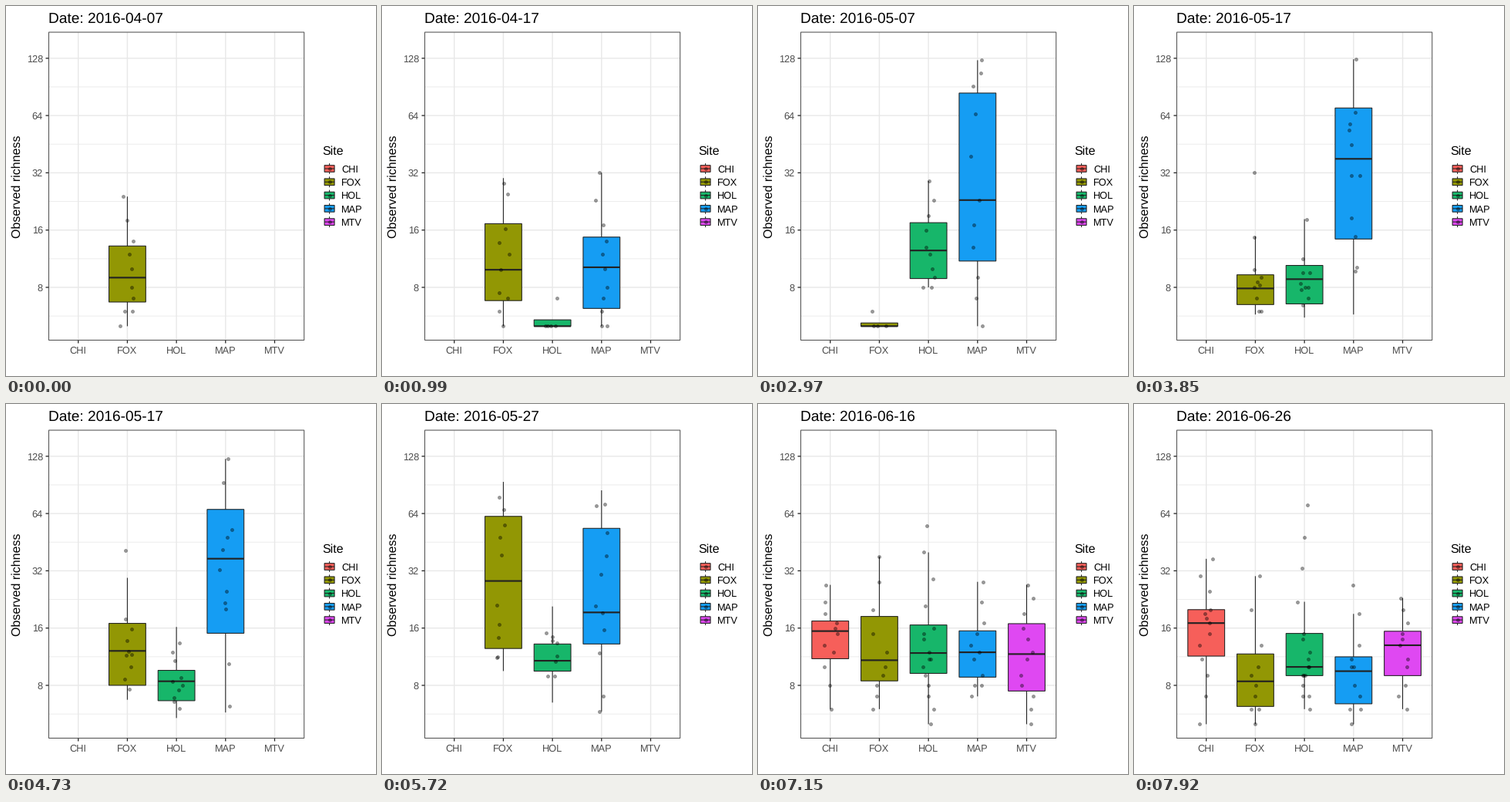
A matplotlib script for the animation above (8 s loop, 480x480 px).

```python
import numpy as np
import matplotlib.pyplot as plt
from matplotlib.animation import FuncAnimation
from matplotlib.patches import Rectangle

plt.rcParams["font.family"] = "Liberation Sans"
plt.rcParams["text.hinting"] = "none"

SIZE, DPI = 480, 80
PX = 72 / DPI                      # points per pixel
LOOP, INTERVAL, STEP = 8000, 40, 110
HOLD, CYCLE = 7, 9                 # steps at rest, steps per date

SITES = ["CHI", "FOX", "HOL", "MAP", "MTV"]
FILLS = ["#f65f5a", "#929704", "#17b66a", "#159df3", "#df48f2"]
COUNTS = dict(zip(SITES, [13, 10, 18, 11, 16]))
INK, AXIS_TEXT, GRID = "#222222", "#4d4d4d", "#e8e8e8"

UNIT = 63.7                        # distance between sites
LEFT, TOP, BOTTOM = 55.5, 34.0, 433.5
RIGHT = LEFT + 5.2 * UNIT
CENTER = {site: LEFT + UNIT * (0.6 + i) for i, site in enumerate(SITES)}
BOX_W = 0.75 * UNIT
LINE = 1.07

FIRST_DAY, DAYS = np.datetime64("2016-04-07"), 10

# Minimum, quartiles and maximum of richness, per surveyed date.
# None is a date halfway between its neighbours.
SURVEYS = [
    dict(FOX=(5, 6.7, 9, 13.2, 24)),
    None,
    dict(FOX=(5, 7, 11.5, 26.4, 44), HOL=(5, 5, 5, 5.4, 7),
         MAP=(5, 6.2, 10.2, 14.7, 32)),
    dict(FOX=(5, 5, 5, 5.2, 6), HOL=(8, 8.9, 12.5, 17.5, 29),
         MAP=(5, 11, 23, 84, 125)),
    dict(FOX=(6, 7, 9, 11, 32), HOL=(5, 6, 8, 9, 16),
         MAP=(6, 15.5, 43.7, 66.6, 127)),
    dict(FOX=(10, 12.8, 34.6, 76.8, 113), HOL=(7, 9.5, 10, 12, 17),
         MAP=(5, 13.5, 20.8, 69.7, 114)),
    dict(CHI=(8, 10.7, 14, 15.2, 19), FOX=(8, 11.5, 14, 29, 49),
         HOL=(5, 9.5, 14, 18.4, 42), MAP=(10, 12.2, 15, 21.2, 30),
         MTV=(5, 6.2, 10.5, 18.5, 32)),
    None,
    dict(CHI=(5, 11.4, 17, 20, 37), FOX=(5, 6.2, 8.4, 11.7, 30),
         HOL=(6, 9, 10, 15, 71), MAP=(5, 6.4, 9.5, 11.3, 27),
         MTV=(6, 9, 13, 15.4, 23)),
]

rng = np.random.default_rng(7)


def y_of(log2_value):
    return 365.0 - 74.3 * (log2_value - 3)


def halfway(before, after):
    """Geometric mean of two surveys; a site in only one is kept as it is."""
    return {site: np.sqrt(np.multiply(before.get(site, after.get(site)),
                                      after.get(site, before.get(site))))
            for site in {**before, **after}}


def sample(site, summary):
    """Box heights and jittered points that follow a five-number summary."""
    low, q1, mid, q3, high = knots = np.log2(summary)
    n = min(COUNTS[site], 3 + round(4 * (high - low)))
    curve = np.interp(np.linspace(0, 1, n), np.linspace(0, 1, 5), knots)
    logs = np.log2(np.round(2 ** curve))
    inside = logs[np.abs(logs - (q1 + q3) / 2) <= 2 * (q3 - q1)]
    stats = np.array([min([q1, *inside]), q1, mid, q3, max([q3, *inside])])
    xs = CENTER[site] + rng.uniform(-9.5, 9.5, n)
    points = np.column_stack([xs, y_of(rng.permutation(logs))])
    return y_of(stats), points


def build_states():
    states = []
    for i, survey in enumerate(SURVEYS):
        survey = survey or halfway(SURVEYS[i - 1], SURVEYS[i + 1])
        samples = {site: sample(site, s) for site, s in survey.items()}
        states.append((str(FIRST_DAY + DAYS * i), samples))
    return states


STATES = build_states()

fig = plt.figure(figsize=(SIZE / DPI, SIZE / DPI), dpi=DPI, facecolor="white")
ax = fig.add_axes([0, 0, 1, 1])
ax.set(xlim=(0, SIZE), ylim=(SIZE, 0))
ax.axis("off")


def line(xs, ys, color=INK, width=LINE, z=1.0):
    return ax.plot(xs, ys, color=color, lw=width * PX, zorder=z, snap=False,
                   solid_capstyle="butt")[0]


def rect(x, y, w, h, fill, edge=INK, z=1.0):
    return ax.add_patch(Rectangle((x, y), w, h, fc=fill, ec=edge, lw=LINE * PX,
                                  zorder=z, snap=False, joinstyle="miter"))


def label(x, y, text, px, color="black", **kw):
    return ax.text(x, y, text, fontsize=px * PX, color=color, va="baseline", **kw)


def dots(offsets):
    x, y = np.transpose(offsets)
    return ax.scatter(x, y, s=(4.2 * PX) ** 2, c="black", alpha=0.4,
                      lw=0.5 * PX, zorder=5)


def draw_panel():
    for power in range(3, 8):
        y = y_of(power)
        line([LEFT, RIGHT], [y, y], GRID, 1.4)
        line([LEFT, RIGHT], [y_of(power - 0.5)] * 2, GRID, 0.8)
        line([LEFT - 4, LEFT], [y, y], INK, 1.3)
        label(48, y + 4.6, str(2 ** power), 12.8, AXIS_TEXT, ha="right")
    for site, x in CENTER.items():
        line([x, x], [TOP, BOTTOM], GRID, 1.4)
        line([x, x], [BOTTOM, BOTTOM + 4], INK, 1.3)
        label(x, 451, site, 12.8, AXIS_TEXT, ha="center")
    rect(LEFT, TOP, RIGHT - LEFT, BOTTOM - TOP, "none", "#555555", 6)
    label(18.9, 234, "Observed richness", 16, ha="center", rotation=90,
          rotation_mode="anchor")


def draw_legend():
    label(410.2, 192.6, "Site", 16)
    key, x = 17.28, 419.6
    for i, (site, fill) in enumerate(zip(SITES, FILLS)):
        y = 211 + key * i
        line([x, x], [y - 0.4 * key, y + 0.4 * key])
        rect(x - 0.375 * key, y - 0.25 * key, 0.75 * key, 0.5 * key, fill, z=2)
        line([x - 0.375 * key, x + 0.375 * key], [y, y], z=3)
        dots([(x, y)])
        label(435, y + 4.7, site, 12.8)


class Box:
    def __init__(self, site, fill):
        self.x = CENTER[site]
        left = self.x - BOX_W / 2
        self.whisker = line([], [], z=2)
        self.body = rect(left, 0, BOX_W, 0, fill, z=3)
        self.median = line([], [], width=2.13, z=4)

    def show(self, stats):
        for part in (self.whisker, self.body, self.median):
            part.set_visible(stats is not None)
        if stats is None:
            return
        low, q1, mid, q3, high = stats
        self.whisker.set_data([self.x, self.x], [low, high])
        self.body.set_y(q3)
        self.body.set_height(q1 - q3)
        self.median.set_data([self.x - BOX_W / 2, self.x + BOX_W / 2], [mid, mid])


draw_panel()
draw_legend()
title = label(55, 22, "", 19.2)
boxes = {site: Box(site, fill) for site, fill in zip(SITES, FILLS)}
cloud = dots([(0, 0)])

NOTHING = (None, np.empty((0, 2)))


def ease(t):
    return 2 * t * t if t < 0.5 else 1 - 2 * (1 - t) ** 2


def update(frame):
    step = int((frame + 0.5) * INTERVAL / STEP)
    index, phase = divmod(step, CYCLE)
    p = ease(max(0, phase - HOLD + 1) / (CYCLE - HOLD + 1))
    now, then = STATES[index], STATES[min(index + 1, len(STATES) - 1)]
    near = now if p < 0.5 else then
    title.set_text("Date: " + near[0])

    points = []
    for site, box in boxes.items():
        stats_a, pts_a = now[1].get(site, NOTHING)
        stats_b, pts_b = then[1].get(site, NOTHING)
        stats, pts = near[1].get(site, NOTHING)
        if stats_a is not None and stats_b is not None:
            stats = stats_a + p * (stats_b - stats_a)
        box.show(stats)
        # paired points glide, the rest appear or vanish halfway
        n = min(len(pts_a), len(pts_b))
        points += [pts_a[:n] + p * (pts_b[:n] - pts_a[:n]), pts[n:]]
    cloud.set_offsets(np.vstack(points))
    return []


anim = FuncAnimation(fig, update, frames=LOOP // INTERVAL, interval=INTERVAL,
                     repeat=True, repeat_delay=0)
plt.show()
```
